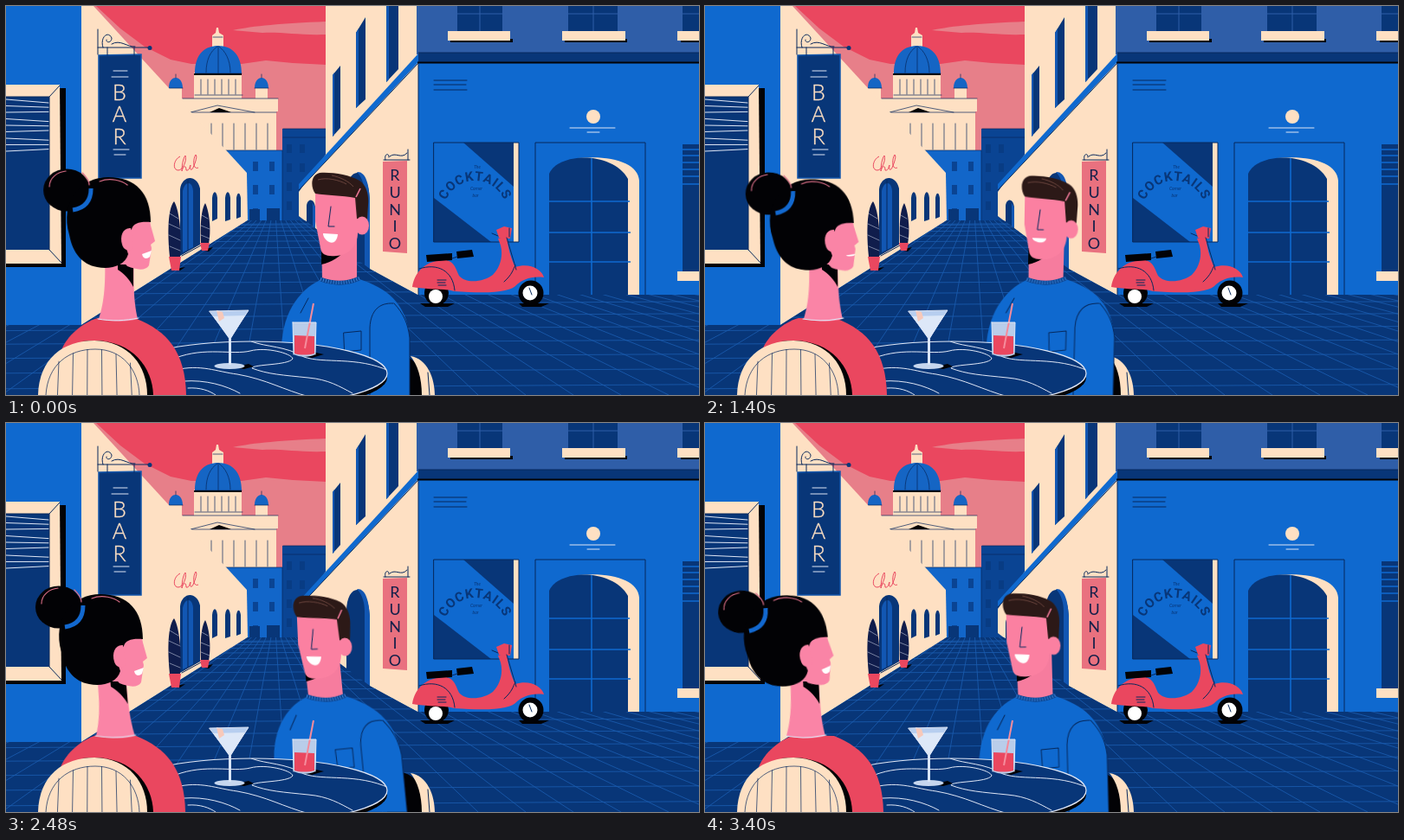
Write an HTML page that moves like this. It is 800 px wide and 450 px high and loops after 3440 ms.

```html
<!DOCTYPE html>
<html lang="en">
<head>
<meta charset="utf-8">
<title>Street bar</title>
<style>
html, body { margin: 0; width: 100%; height: 100%; overflow: hidden; background: #0f69cf; }
svg { display: block; width: 100vw; height: 100vh; }
.blue { fill: #0f69cf; } .navy { fill: #083678; } .cream { fill: #fee0c3; }
.red { fill: #ea475f; } .skin { fill: #fa84a6; } .tan { fill: #f67c9e; } .ink { fill: #020205; }
.ln { fill: none; stroke: #06285c; stroke-width: 1; stroke-linecap: round; stroke-linejoin: round; }
.thin { stroke-width: .7; }
.lt { fill: none; stroke: #dfe6f5; stroke-width: 1; stroke-linecap: round; }
.bl { fill: none; stroke: #0f69cf; stroke-width: 1.6; }
text { text-anchor: middle; }
.bar { font: 300 25px Lato, sans-serif; fill: #fee0c3; stroke: #fee0c3; stroke-width: .4; }
.inn { font: 400 18px Lato, sans-serif; fill: #14204a; }
.arc { font: 700 15px Roboto, sans-serif; letter-spacing: .7px; fill: #083678; }
.tiny { font: italic 5px Lato, sans-serif; fill: #083678; }

#herHead, #herNeck, #herBody, #herMouth, #hisHead, #hisBody, #hisMouth {
  animation: herHead 3440ms linear infinite;
}
#herHead { transform-origin: 135px 290px; }
#herNeck { transform-origin: 130px 362px; animation-name: herNeck; }
#herBody { animation-name: herBody; }
#herMouth { transform-origin: 163px 287px; animation-name: herMouth; }
#hisHead { transform-origin: 388px 290px; animation-name: hisHead; }
#hisBody { transform-origin: 400px 450px; animation-name: hisBody; }
#hisMouth { transform-origin: 375px 266px; animation-name: hisMouth; }

@keyframes herHead {
  0% { transform: translate(0, 0) rotate(0deg); }
  4.65% { transform: translate(13px, -1px) rotate(6.5deg); }
  15.12% { transform: translate(10px, 0) rotate(5.7deg); }
  40.7% { transform: translate(6px, 2px) rotate(-1.7deg); }
  45.35% { transform: translate(5px, 2px) rotate(-2deg); }
  54.65% { transform: translate(4px, -1px) rotate(5deg); }
  58.14% { transform: translate(2px, 0) rotate(4deg); }
  72.09% { transform: translate(-9px, 0) rotate(0deg); }
  89.53% { transform: translate(-22px, 0) rotate(-6.5deg); }
  95.35% { transform: translate(-23px, 0) rotate(-7deg); }
  97.67%, 98.84% { transform: translate(-22px, 0) rotate(-4.5deg); animation-timing-function: step-end; }
  100% { transform: translate(0, 0) rotate(0deg); }
}
@keyframes herNeck {
  0% { transform: translate(0) skewX(0deg); }
  4.65%, 15.12% { transform: translate(8px) skewX(-2deg); }
  40.7%, 45.35% { transform: translate(7px) skewX(1deg); }
  58.14% { transform: translate(1px) skewX(-1deg); }
  72.09% { transform: translate(-3px) skewX(5deg); }
  89.53%, 98.84% { transform: translate(-13px) skewX(2.5deg); animation-timing-function: step-end; }
  100% { transform: translate(0) skewX(0deg); }
}
@keyframes herBody {
  0%, 100% { transform: translate(0); }
  4.65%, 45.35% { transform: translate(2px); }
  58.14% { transform: translate(0); }
  89.53%, 98.84% { transform: translate(-2px); animation-timing-function: step-end; }
}
@keyframes herMouth {
  0%, 15.12%, 54.65%, 100% { transform: scaleY(1); }
  40.7%, 45.35% { transform: scaleY(.3); }
}
@keyframes hisHead {
  0%, 100% { transform: translate(0, 0) rotate(0deg); }
  4.65%, 45.35% { transform: translate(11px, 4px) rotate(1deg); animation-timing-function: ease-in; }
  50% { transform: translate(-5px, 1px) rotate(0deg); animation-timing-function: ease-out; }
  54.65%, 95.35% { transform: translate(-18px, 6px) rotate(-2.5deg); }
  97.67%, 98.84% { transform: translate(-8px, 4px) rotate(-1deg); animation-timing-function: step-end; }
}
@keyframes hisBody {
  0%, 100% { transform: translate(0) skewX(0deg); }
  4.65%, 45.35% { transform: translate(5px) skewX(-1.5deg); animation-timing-function: ease-in-out; }
  54.65%, 95.35% { transform: translate(-3px) skewX(5.5deg); }
  97.67%, 98.84% { transform: translate(0) skewX(1.5deg); animation-timing-function: step-end; }
}
@keyframes hisMouth {
  0%, 54.65%, 98.84%, 100% { transform: scale(1); }
  4.65%, 45.35% { transform: scale(.95, .5); }
}
</style>
</head>
<body>
<svg viewBox="0 0 800 450" preserveAspectRatio="none">
<defs>
  <clipPath id="road"><path d="M279 248H345L420 304L475 334H800V450H0V369H87Z"/></clipPath>
  <clipPath id="top"><ellipse cx="285" cy="425" rx="155" ry="37"/></clipPath>
  <clipPath id="seat"><path d="M37 450C38 408 66 387 102 387C142 388 163 416 163 450Z"/></clipPath>
  <path id="ring" d="M505.500 238A36 36 0 0 1 577.500 238"/>
</defs>

<!-- sky and cathedral -->
<path fill="#e77f89" d="M90 0H370V260H90Z"/>
<path class="red" d="M104 0H370V68L331 66L300 63L272 67L214 67L190 62L160 47L132 26Z"/>
<path fill="#e77f89" d="M262 28C286 23 318 20 369 18V33C338 34 320 30 296 31Z"/>
<g class="cream">
  <path d="M243 25L245 25L246 31L251 34V47H238V34L242 31Z"/>
  <path d="M217 77H272V107H314V122H312V170H200V122L193 107H217Z"/>
  <path d="M189 94H203V108H189ZM288 94H302V108H288Z"/>
</g>
<path fill="#1565c4" d="M218 78C218 54 231 46 245 46C259 46 272 55 272 78ZM188 95C188 86 192 83 196 83C200 83 204 87 204 95ZM287 95C287 87 291 83 295 83C299 83 303 87 303 95Z"/>
<path class="ln thin" d="M218 78H272M231 77C231 62 236 52 244 47M245 78V47M259 77C259 62 253 52 246 47M196 83V79M295 83V79M239 36H250M218 103H273M213 123H312M213 123L244 115L287 123M188 95H204M287 95H303M204 107H314"/>
<path class="ink" d="M217 78H272V80H217ZM235 123L246 118L260 123Z"/>
<g id="pillars" class="ln thin"></g>

<!-- far houses -->
<path fill="#1266c9" d="M240 167H320V250H240Z"/>
<path fill="#0a4493" d="M319 142H369V250H319Z"/>
<path class="ln thin" d="M250 167H319V250M320 142H369M320 152H369"/>
<g id="farWindows"></g>

<!-- left wall -->
<path class="cream" d="M87 0H101L278 193L279 248L87 369Z"/>
<path class="blue" d="M0 0H87V369H0Z"/>
<path class="ink" d="M8 95H69V302H0V290Z"/>
<path class="cream" d="M0 91H62L64 298H0Z"/>
<path class="navy" d="M0 105H50V282H0Z"/>
<path class="ln" d="M50 105L62 92M50 282L64 297M0 105H50V282"/>
<g id="blind" class="lt"></g>
<path class="navy" d="M201 289V212C203 196 220 194 224 211V276ZM238 249V222C239 213 243 213 244 222V246ZM253 249V222C254 213 258 213 259 222V247ZM266 246V222C267 215 270 215 271 222V244Z"/>
<path fill="#1257b3" d="M204 285V214C206 203 215 201 216 214V279Z"/>
<path class="ln" d="M203 289L225 277M210 201V282"/>
<path fill="none" stroke="#ea475f" d="M201 174C193 178 192 190 199 190C204 190 209 179 207 173C204 177 203 186 203 191C205 184 208 184 208 190C212 191 212 185 213 184C212 190 214 191 216 187C219 180 221 174 219 172C216 176 215 190 222 187"/>
<path d="M107 57L156 56V199H107Z" fill="#083678" stroke="#1256ab" stroke-width="1.500"/>
<path class="ln" stroke-width="1.500" d="M106 27V56M106 48H166M112 48C108 36 118 28 122 37C122 43 115 43 116 39M122 44C132 38 140 48 149 47M117 48V57M148 48V57"/>
<circle class="navy" cx="166" cy="48.500" r="2.500"/>
<path class="lt" d="M124 75H140M122 82H141M124 166H142M125 172H138"/>
<g class="bar"><text x="131" y="109">B</text><text x="131" y="134">A</text><text x="131" y="160">R</text></g>

<!-- right wall -->
<path class="cream" d="M369 0H477V335L420 305L338 243V215L369 172Z"/>
<path class="navy" d="M439 0H453V73L439 88ZM404 31L415 13V108L404 118ZM377 80L386 69V141L377 151Z"/>
<path fill="#1257b3" d="M439 0H442V85L439 88ZM404 31L407 26V115L404 118ZM377 80L379 77V149L377 151Z"/>
<path class="blue" d="M338 206L476 55V65L338 213Z"/>
<path class="ln" stroke-width="1.800" d="M338 213L476 66"/>
<path class="navy" d="M393 289V217C394 184 418 184 420 224V306ZM347 250V231C348 222 356 222 357 233V257Z"/>
<path fill="#1257b3" d="M414 301V218C414 204 409 196 405 192C415 191 419 205 420 224V306ZM354 255V228L357 233V257Z"/>
<path class="ln" d="M436 178H466M464 166V178M438 178C436 170 443 170 442 175M443 174C450 168 456 178 463 170"/>
<path fill="#e9717f" d="M435 180L463 179V286L435 284Z"/>
<g class="inn"><text x="449" y="202">R</text><text x="449" y="222">U</text><text x="449" y="242">N</text><text x="449" y="261">I</text><text x="449" y="281">O</text></g>

<!-- cocktail house -->
<path class="blue" d="M476 60H800V335H476Z"/>
<path fill="#2f5ea8" d="M474 0H800V56H474Z"/>
<path class="navy" d="M476 54H800V66H476Z"/>
<path class="ink" d="M475 64.500H800V66.500H475Z"/>
<path class="ln" d="M476 54H800M476 66V334"/>
<path class="navy" d="M521 0H573V30H521ZM649 0H706V30H649ZM781 0H800V30H781Z"/>
<path fill="none" stroke="#2f5ea8" d="M547 0V30M521 9H573M678 0V30M649 9H706M781 9H800"/>
<path class="ink" d="M513 38H585V42H513ZM645 38H717V42H645ZM779 38H800V42H779Z"/>
<path class="cream" d="M510 29H582V40H510ZM642 29H715V40H642ZM775 29H800V40H775Z"/>
<path class="ln" d="M494 86H532M494 91H531M494 97H532"/>
<path class="lt" d="M651 141H703M671 146H685"/>
<circle class="cream" cx="678" cy="128" r="8"/>
<path class="navy" d="M494 158H586V273H494Z"/>
<path class="blue" d="M494 158H528L586 209V273H560L494 222Z"/>
<path class="cream" d="M586 158H592V273H586Z"/>
<path class="ln" d="M494 158H592V273H494Z"/>
<text class="arc"><textPath href="#ring" startOffset="50%">COCKTAILS</textPath></text>
<g class="tiny"><text x="544" y="188">The</text><text x="543" y="213">Corner</text><text x="542" y="221">bar</text></g>
<path class="ln" d="M611 334V158H738V334"/>
<path class="cream" d="M660 176C700 172 730 182 731 202V335H714V200Z"/>
<path class="navy" d="M627 335V194C638 169 700 168 718 200V335Z"/>
<path class="bl" stroke-width="2" d="M676 176V334M627 226H720M627 262H721M627 296H721"/>
<path class="navy" d="M781 160H800V307H781Z"/>
<path class="bl" stroke-width="1" d="M781 166H800M781 173H800M781 181H800M781 189H800M781 197H800M781 206H800"/>
<path class="cream" d="M775 307H800V318H775Z"/>

<!-- ground -->
<g clip-path="url(#road)">
  <path class="navy" d="M0 240H800V450H0Z"/>
  <path id="paving" fill="none" stroke="#1b5db2" stroke-width=".8"/>
</g>

<!-- potted trees -->
<path class="ink" d="M189 305L207 302L201 306ZM225 282L239 279L234 284Z"/>
<path fill="#101d4c" d="M189 290C186 262 187 234 194 226C200 235 203 265 201 290ZM225 275C224 255 225 236 230 228C235 238 237 260 234 275Z"/>
<path class="red" d="M188 290H202L200 306H191ZM224 274H235L233 283H226Z"/>
<path class="lt" stroke-opacity=".5" d="M189 240L199 246M188 252L201 258M188 265L201 271M189 278L201 283M226 242L233 246M225 254L235 258M225 265L235 269"/>

<!-- scooter -->
<path class="ink" d="M478 344H518L510 348H484ZM592 344H627L618 348H596Z"/>
<circle class="ink" cx="497" cy="332" r="14"/><circle cx="496" cy="336" r="8" fill="#fff"/>
<circle class="ink" cx="606" cy="332" r="14.500"/><circle cx="605" cy="332" r="8.500" fill="#fff"/>
<path class="red" d="M469 325C472 305 488 293 508 294C518 296 519 304 523 312C531 322 552 319 562 311C571 302 574 289 571 277L568 269L578 266C580 284 584 294 588 302C604 297 618 304 621 314C606 312 596 317 590 322C583 331 560 333 517 330C511 327 483 328 469 325Z"/>
<path class="ink" d="M485 288L515 286V294L486 296ZM520 284L538 282L540 290L521 292Z"/>
<path class="red" d="M566 259L575 255L584 257L582 269L569 268Z"/>
<path class="ln" stroke="#3d1224" d="M498 317H508M498 320H507M499 323H508M477 304C498 297 516 306 518 329M578 268L589 305M561 263L568 266M604 326L607 334M581 257V267M575 319C585 310 585 305 588 300M515 292L521 290"/>

<!-- his chair, body, head -->
<path class="ink" d="M440 403C470 399 486 422 486 450H440Z"/>
<path class="cream" d="M467 405C486 408 495 430 495 450H480C480 430 475 415 467 405Z"/>
<path class="ln" d="M487 424L489 450"/>
<g id="hisBody">
  <path class="blue" d="M318 396C319 350 343 325 365 316H408C438 326 462 342 466 384V450H330Z"/>
  <path class="tan" d="M364 262H405V316C393 322 376 320 365 317Z"/>
  <path class="ink" d="M364 280H394C386 290 375 297 364 299Z"/>
  <path d="M363 316C379 322 395 321 408 315" fill="none" stroke="#0a438f" stroke-width="5"/>
  <path d="M363 316C379 322 395 321 408 315" fill="none" stroke="#3a85dc" stroke-width="4" stroke-dasharray="1 2"/>
  <path class="ln" d="M420 450V372C421 352 431 343 447 344M466 450V384C464 367 459 356 448 344M390 378L410 376V398L391 400ZM340 355L349 338"/>
</g>
<g id="hisHead">
  <path fill="#fb80a1" d="M357 212H406V262C406 277 396 288 381 289C371 290 364 288 363 280L357 249Z"/>
  <path fill="#2c1917" d="M357 217C351 209 352 195 362 193C376 192 396 195 408 202C417 208 419 220 418 230L417 247C413 250 408 248 405 246L403 222C388 219 370 219 357 217Z"/>
  <ellipse fill="#fb80a1" cx="411" cy="254" rx="8" ry="10.500"/>
  <path fill="none" stroke="#6a443d" d="M360 201C370 198 384 201 393 206M376 196C386 198 396 203 401 209"/>
  <path fill="none" stroke="#fb80a1" stroke-width="1.500" d="M404 221L409 211"/>
  <path class="ln" stroke="#501a32" d="M375 232L372 255H379"/>
  <path id="hisMouth" fill="#fff" d="M366 263L383 264C382 273 377 275 373 273C369 271 366 267 366 263Z"/>
</g>

<!-- table and drinks -->
<ellipse class="ink" cx="286" cy="430" rx="154" ry="37"/>
<ellipse cx="285" cy="425" rx="155" ry="37" fill="#083678" stroke="#dfe6f5" stroke-width="1.200"/>
<g clip-path="url(#top)">
  <path class="lt" d="M196 407C230 394 262 404 282 399C300 394 330 402 331 408C326 416 285 414 284 419C302 426 320 427 349 430C372 432 385 440 400 448M196 421C225 414 243 423 267 426C301 432 320 444 350 452M205 434C230 432 254 439 270 448M283 388C302 395 322 393 344 406C367 414 405 405 442 422M365 390C383 398 404 399 425 405M210 442C224 441 235 445 242 450"/>
</g>
<path class="ink" d="M262 418L280 414L286 417L275 420ZM344 405L358 401L367 403L353 407Z"/>
<ellipse cx="258" cy="416.500" rx="17.500" ry="3.500" fill="#c6d6ee"/>
<path d="M257 380H260L260 415H257Z" fill="#d9e5f7"/>
<path fill="#b7ceef" d="M235 353L280 352L260 384H257Z"/>
<path fill="#dde8f8" d="M239 359L276 358L260 384H257Z"/>
<path fill="#f7c9ba" d="M243 352L250 354L252 361L246 365Z"/>
<path class="lt" stroke="#fff" d="M235 353L280 352L259 384Z"/>
<path fill="#b9cdea" d="M331 366H358L357 403C350 407 338 406 332 403Z"/>
<path class="red" d="M333 381L356 382V402C349 404 339 404 333 402Z"/>
<path fill="none" stroke="#f58c9c" stroke-width="2" d="M355 344L345 396"/>
<path class="lt" stroke="#fff" d="M331 366H358L357 403M331 366L332 403"/>

<!-- her body, head, chair -->
<g id="herBody">
  <path class="red" d="M64 450V398C70 382 88 366 106 361L151 362C186 376 207 400 208 450Z"/>
</g>
<g id="herNeck">
  <path class="skin" d="M114 285H148C147 318 147 340 152 362C138 366 122 365 107 362C114 341 115 319 114 285Z"/>
  <path class="ink" d="M129 299H147V325C143 317 136 309 129 305Z"/>
  <path class="lt" d="M106 362C122 365 138 364 153 361"/>
</g>
<g id="herHead">
  <path class="skin" d="M130 250L164 238L167 254L172 272L167 276L168 280L165 300C161 307 150 305 140 301L128 288Z"/>
  <ellipse class="ink" cx="70" cy="213" rx="27" ry="24.500"/>
  <path class="ink" d="M73 265C62 226 86 198 118 198C150 198 167 217 167 250C155 249 147 251 145 258C139 266 136 274 141 287C137 301 120 305 105 302C88 299 77 286 73 265Z"/>
  <path d="M77 236C90 234 98 226 98 211" fill="none" stroke="#1268cf" stroke-width="5"/>
  <path class="skin" d="M144 257C135 256 131 266 134 276C136 283 143 285 147 279Z"/>
  <path fill="none" stroke="#d96d86" stroke-width="1.200" stroke-linecap="round" d="M50 209C50 199 59 192 69 191M108 203C120 198 134 202 140 207M88 193C93 198 96 202 96 207"/>
  <path id="herMouth" fill="#fff" d="M168 283L157 287C158 293 163 293 166 290Z"/>
</g>
<path class="ink" d="M88 388C142 381 169 416 170 450H120Z"/>
<g clip-path="url(#seat)">
  <path class="cream" d="M30 380H170V450H30Z"/>
  <g id="slats" class="ln thin"></g>
  <path class="ln thin" d="M46 450C48 415 72 397 103 397C134 397 153 420 154 450"/>
</g>
</svg>
<script>
const $ = id => document.getElementById(id);
const line = (x1, y1, x2, y2) => `<path d="M${x1} ${y1}L${x2} ${y2}"/>`;
const each = (n, make) => Array.from({ length: n }, (_, i) => make(i)).join('');

// perspective paving
const vx = 310, vy = 225;
$('paving').setAttribute('d',
  each(72, i => `M${vx} ${vy}L${-1600 + i * 55} 450`) +
  each(19, i => { const y = 251 + 1.2 * i ** 1.75; return `M0 ${y + 3}L800 ${y - 2}`; }));

$('pillars').innerHTML =
  each(6, i => line(225 + i * 8, 85, 225 + i * 8, 102)) +
  each(7, i => line(224 + i * 13, 136, 224 + i * 13, 166));

$('blind').innerHTML = each(9, i => line(0, 108 + i * 7.5, 49, 112 + i * 7.2 - (i % 3) * 2));

$('slats').innerHTML = each(6, i => {
  const x = 61 + i * 16.5, top = 397 + ((x - 101) / 52) ** 2 * 24;
  return line(x, top, x + (x - 100) * .04, 450);
});

const pane = (x, y, w, h, c) => `<rect x="${x}" y="${y}" width="${w}" height="${h}" fill="${c}"/>`;
$('farWindows').innerHTML =
  each(6, i => pane(285 + (i % 2) * 19, 180 + (i >> 1) * 27, 6, 11, '#0a4493')) +
  each(8, i => pane(324 + (i % 2) * 15, 160 + (i >> 1) * 22, 6, 10, '#083c84')) +
  pane(281, 235, 12, 14, '#083678') + pane(301, 234, 15, 15, '#083678');
</script>
</body>
</html>
```
